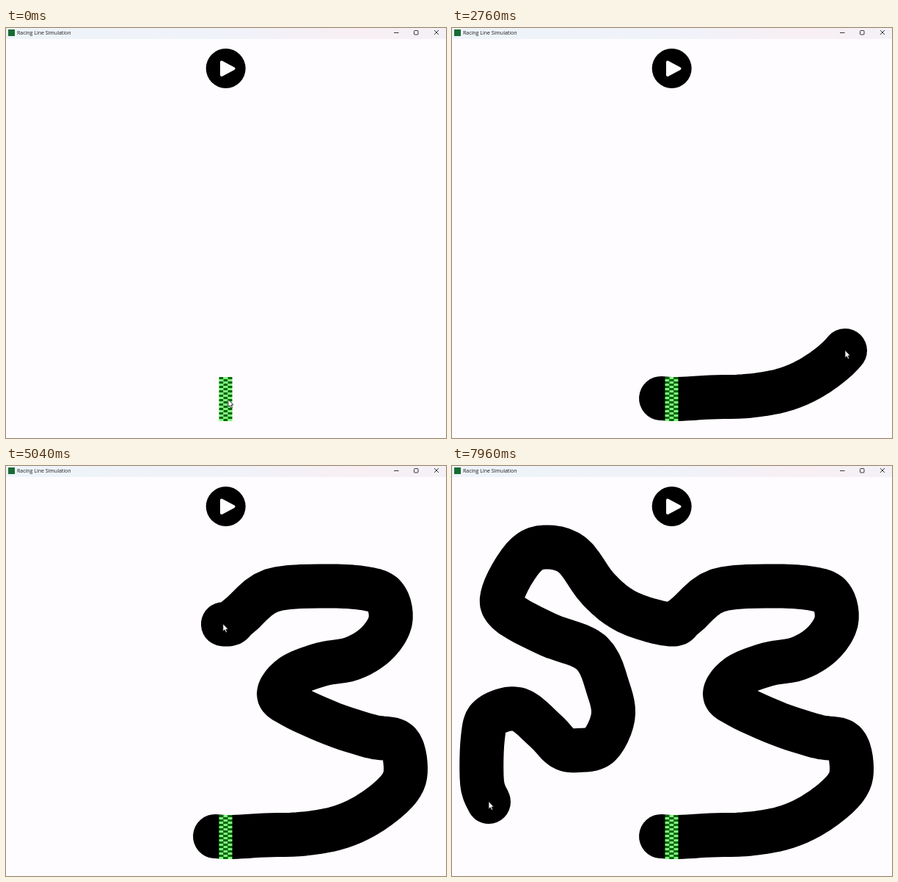
An HTML page with a canvas for the animation above (8000 ms loop, 600x558 px).

```html
<!DOCTYPE html>
<html lang="en">
<head>
<meta charset="utf-8">
<title>Racing Line Simulation</title>
<style>
  html, body { margin: 0; width: 100%; height: 100%; overflow: hidden; background: #fefcfe; }
  canvas { display: block; }
</style>
</head>
<body>
<canvas id="stage" width="600" height="558"></canvas>
<script>
const ctx = document.getElementById('stage').getContext('2d');
const LOOP = 8000, STEP = 40, BRUSH = 60;
const DRAW_START = 1160, START = [285, 504];

// Each stroke leg: arrival time, then the points passed on the way.
const legs = [
  [1920, [308, 505], [353, 502.5]],
  [2760, [407, 500.5], [457, 491], [500, 470], [536, 439]],
  [3640, [545, 411], [535, 376], [498, 368], [445, 351], [390, 326], [372, 310]],
  [4200, [390, 286], [430, 270], [472, 262], [505, 242], [524, 212]],
  [4480, [519, 181], [497, 168]],
  [5320, [440, 163.5], [362, 169.5], [318, 204], [298, 215.5], [240, 199], [200, 168]],
  [5880, [164, 121], [125, 110.5], [97, 125], [70, 172]],
  [6160, [76, 199], [130, 229], [190, 254]],
  [6840, [213, 303], [219.5, 342], [201, 380], [171, 387]],
  [7000, [150, 383], [127, 360]],
  [7840, [90, 331], [52, 341], [42, 370], [41, 431]],
  [7960, [50, 457]]
];

const mix = (a, b, k) => a + (b - a) * k;
const lerp = (p, q, k) => [mix(p[0], q[0], k), mix(p[1], q[1], k)];
const dist = (p, q) => Math.hypot(q[0] - p[0], q[1] - p[1]);
const clamp = v => Math.max(0, Math.min(1, v));
const ease = k => k * k * (3 - 2 * k);

const nodes = [START, ...legs.flatMap(leg => leg.slice(1))];

// Point on the Catmull-Rom curve between nodes i and i + 1.
function spline(i, k) {
  const p = nodes[i], q = nodes[i + 1];
  const before = nodes[i - 1] || p, after = nodes[i + 2] || q;
  return [0, 1].map(a => {
    const m = (q[a] - before[a]) / 2, n = (after[a] - p[a]) / 2, d = q[a] - p[a];
    return p[a] + k * (m + k * (3 * d - 2 * m - n + k * (m + n - 2 * d)));
  });
}

// Stroke samples with the time at which the pointer reaches each.
function buildStroke() {
  const samples = [{ at: DRAW_START, p: START }];
  let node = 0, from = DRAW_START;
  for (const [to, ...points] of legs) {
    let last = samples[samples.length - 1].p, length = 0;
    const part = [];
    for (let i = 0; i < points.length; i++, node++) {
      for (let s = 1; s <= 6; s++) {
        const p = spline(node, s / 6);
        length += dist(last, p);
        part.push({ p, length });
        last = p;
      }
    }
    for (const s of part) {
      const share = s.length / length;
      const k = from === DRAW_START ? Math.sqrt(share) : share;
      samples.push({ at: mix(from, to, k), p: s.p });
    }
    from = to;
  }
  return samples;
}

const stroke = buildStroke();

function strokeAt(t) {
  const path = stroke.filter(s => s.at <= t).map(s => s.p);
  const next = stroke[path.length];
  if (next) {
    const prev = stroke[path.length - 1];
    path.push(lerp(prev.p, next.p, (t - prev.at) / (next.at - prev.at)));
  }
  return path;
}

function hoverAt(t) {
  const rest = lerp([303, 506], [300, 509], ease(clamp((t - 40) / 480)));
  return lerp(rest, START, ease(clamp((t - 680) / 400)));
}

function shape(points) {
  ctx.beginPath();
  points.forEach(([x, y]) => ctx.lineTo(x, y));
}

function titleBar() {
  const g = ctx.createLinearGradient(0, 0, 600, 0);
  g.addColorStop(0, '#edf4f9');
  g.addColorStop(0.55, '#f1f2f9');
  g.addColorStop(0.8, '#f8eff3');
  g.addColorStop(1, '#f3f1f7');
  ctx.fillStyle = g;
  ctx.fillRect(0, 0, 600, 15);
  ctx.fillStyle = '#176b32';
  ctx.fillRect(3, 2, 9, 9);
  ctx.fillStyle = '#1a1a1a';
  ctx.font = '7px "Open Sans", "Noto Sans", sans-serif';
  ctx.fillText('Racing Line Simulation', 15, 9);

  ctx.strokeStyle = '#222';
  ctx.lineWidth = 0.9;
  ctx.beginPath();
  ctx.moveTo(529, 6.5);
  ctx.lineTo(535.5, 6.5);
  ctx.moveTo(584, 3);
  ctx.lineTo(590, 9);
  ctx.moveTo(590, 3);
  ctx.lineTo(584, 9);
  ctx.roundRect(556.5, 3.5, 5.5, 5.5, 1);
  ctx.stroke();
}

function playButton() {
  ctx.fillStyle = '#000';
  ctx.beginPath();
  ctx.arc(299.7, 55, 27, 0, Math.PI * 2);
  ctx.fill();
  ctx.fillStyle = ctx.strokeStyle = '#fefcfe';
  ctx.lineWidth = 4;
  ctx.lineJoin = 'round';
  shape([[294, 46.5], [294, 64], [310.5, 55.2]]);
  ctx.closePath();
  ctx.fill();
  ctx.stroke();
}

function startLine() {
  for (let row = 0; row < 20; row++) {
    for (let col = 0; col < 3; col++) {
      ctx.fillStyle = (row + col) % 2 ? '#7dfb7d' : '#046404';
      ctx.fillRect(290.5 + col * 6, 475 + row * 3, 6, 3);
    }
  }
}

function track(path) {
  ctx.strokeStyle = '#000';
  ctx.lineWidth = BRUSH;
  ctx.lineCap = ctx.lineJoin = 'round';
  shape(path);
  ctx.lineTo(path[path.length - 1][0] + 0.01, path[path.length - 1][1]);
  ctx.stroke();
  ctx.lineCap = 'butt';
}

function pointer([x, y]) {
  ctx.save();
  ctx.translate(x, y - 0.5);
  shape([[0, 0], [0, 10.2], [2.3, 8.2], [3.9, 11.8], [5.6, 11], [4, 7.6], [7, 7.4]]);
  ctx.closePath();
  ctx.fillStyle = '#fff';
  ctx.strokeStyle = '#111';
  ctx.lineWidth = 0.8;
  ctx.fill();
  ctx.stroke();
  ctx.restore();
}

function draw(t) {
  const path = t < DRAW_START ? null : strokeAt(t);
  ctx.fillStyle = '#fefcfe';
  ctx.fillRect(0, 0, 600, 558);
  titleBar();
  if (path) track(path);
  startLine();
  playButton();
  pointer(path ? path[path.length - 1] : hoverAt(t));
}

const begin = performance.now();
function tick() {
  const t = (performance.now() - begin) % LOOP;
  draw(Math.floor(t / STEP) * STEP);
  requestAnimationFrame(tick);
}
tick();
</script>
</body>
</html>
```
